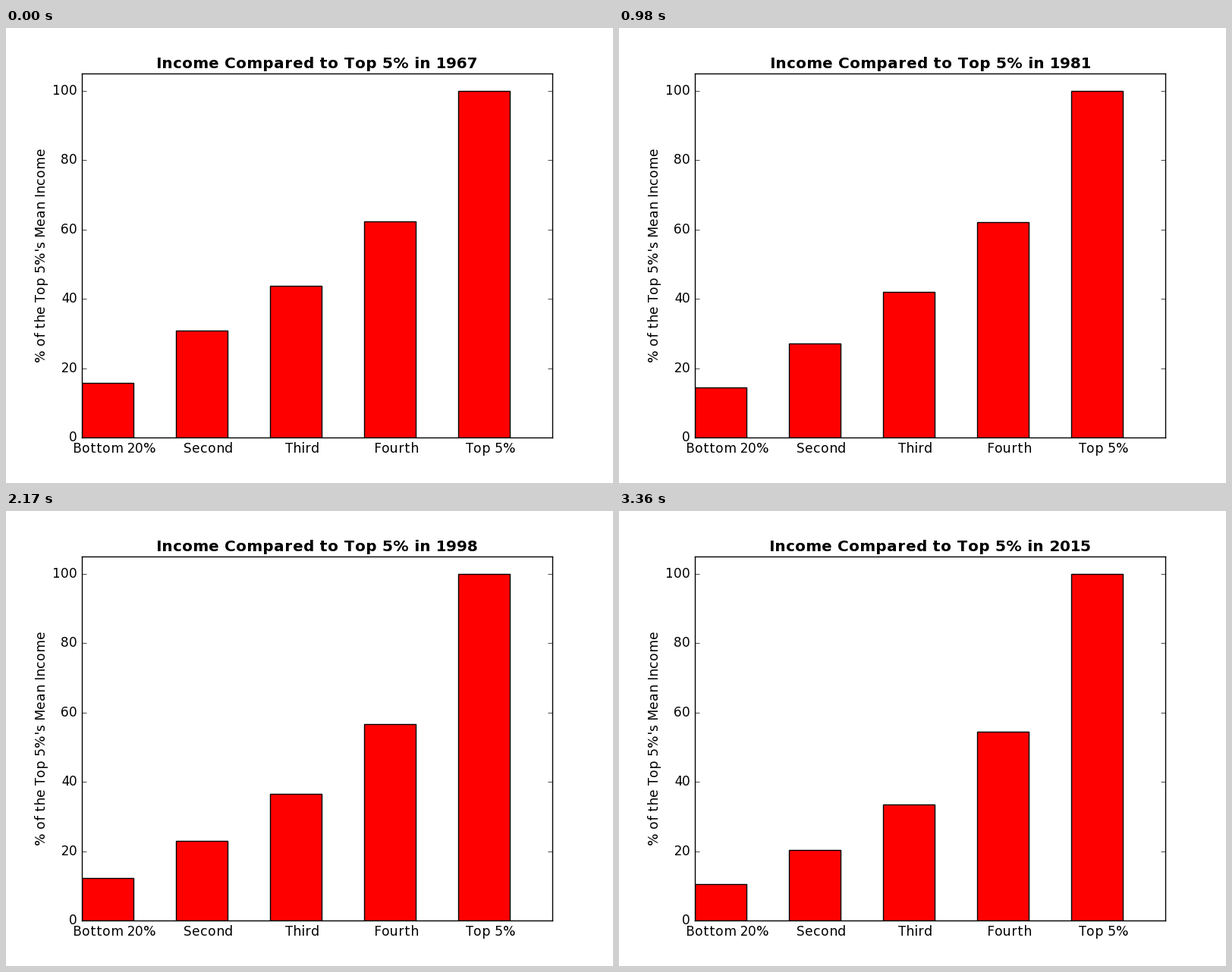
A matplotlib script for the animation above (5.95 s loop, 800 px wide and 600 px high).

```python
import numpy as np
import matplotlib.pyplot as plt
from matplotlib.animation import FuncAnimation

plt.style.use("classic")
plt.rcParams.update({
    "font.family": "DejaVu Sans",
    "text.hinting_factor": 1,  # whole-pixel letter spacing
    "text.kerning_factor": 6,
})

W, H, DPI = 800, 600, 100
LEFT, BOTTOM = 100, 540
STEP, UNIT = 124, 480 / 105  # pixels per bar slot and per percent
FIRST, LAST = 1967, 2015
FRAMES, INTERVAL = 85, 70

# Turning points of each bar; years between them are interpolated
KEY_YEARS = [1967, 1969, 1972, 1976, 1981, 1986, 1998, 2008, 2013, 2015]
KEY_SHARES = {
    "Bottom 20%": [15.8, 16.4, 15.3, 15.3, 14.5, 13.4, 12.2, 11.5, 10.2, 10.6],
    "Second": [30.8, 31.5, 29.4, 28.6, 27.1, 25.4, 23.0, 21.7, 20.0, 20.3],
    "Third": [43.7, 45.5, 43.4, 44.0, 42.0, 39.4, 36.5, 34.8, 32.8, 33.5],
    "Fourth": [62.3, 63.8, 62.1, 63.3, 62.1, 59.7, 56.7, 55.7, 53.8, 54.5],
    "Top 5%": [100] * len(KEY_YEARS),
}


def heights(year):
    return [np.interp(year, KEY_YEARS, s) for s in KEY_SHARES.values()]


fig = plt.figure(figsize=(W / DPI, H / DPI), dpi=DPI, facecolor="white")
ax = fig.add_axes([0.125, 0.1, 0.775, 0.8])
ax.set_xlim(0, 5)
ax.set_ylim(0, 105)
ax.set_xticks([])
ax.set_yticks(range(0, 101, 20))
ax.tick_params(axis="y", labelleft=False)

bars = ax.bar(range(5), heights(FIRST), 0.55, align="edge",
              color="red", edgecolor="black", linewidth=1)


def label(x, y, text, **style):
    """Place text at a pixel position measured from the top left."""
    style = {"fontsize": 12, "ha": "center", "va": "baseline", **style}
    return fig.text(x / W, 1 - y / H, text, **style)


for i, name in enumerate(KEY_SHARES):
    label(LEFT + STEP * (i + 0.345), 560, name)
for v in range(0, 101, 20):
    label(94.44, BOTTOM - v * UNIT + 5.07, str(v), ha="right")
label(55.7, 300, "% of the Top 5%'s Mean Income", va="bottom",
      rotation=90, rotation_mode="anchor")
title = label(410, 53.06, "", fontsize=14.4, fontweight="bold")


def draw(frame):
    year = min(FIRST + frame, LAST)
    for bar, h in zip(bars, heights(year)):
        bar.set_height(h)
    title.set_text(f"Income Compared to Top 5% in {year}")
    return [*bars, title]


anim = FuncAnimation(fig, draw, frames=FRAMES, interval=INTERVAL,
                     init_func=lambda: draw(0), repeat=True, repeat_delay=0)
plt.show()
```
